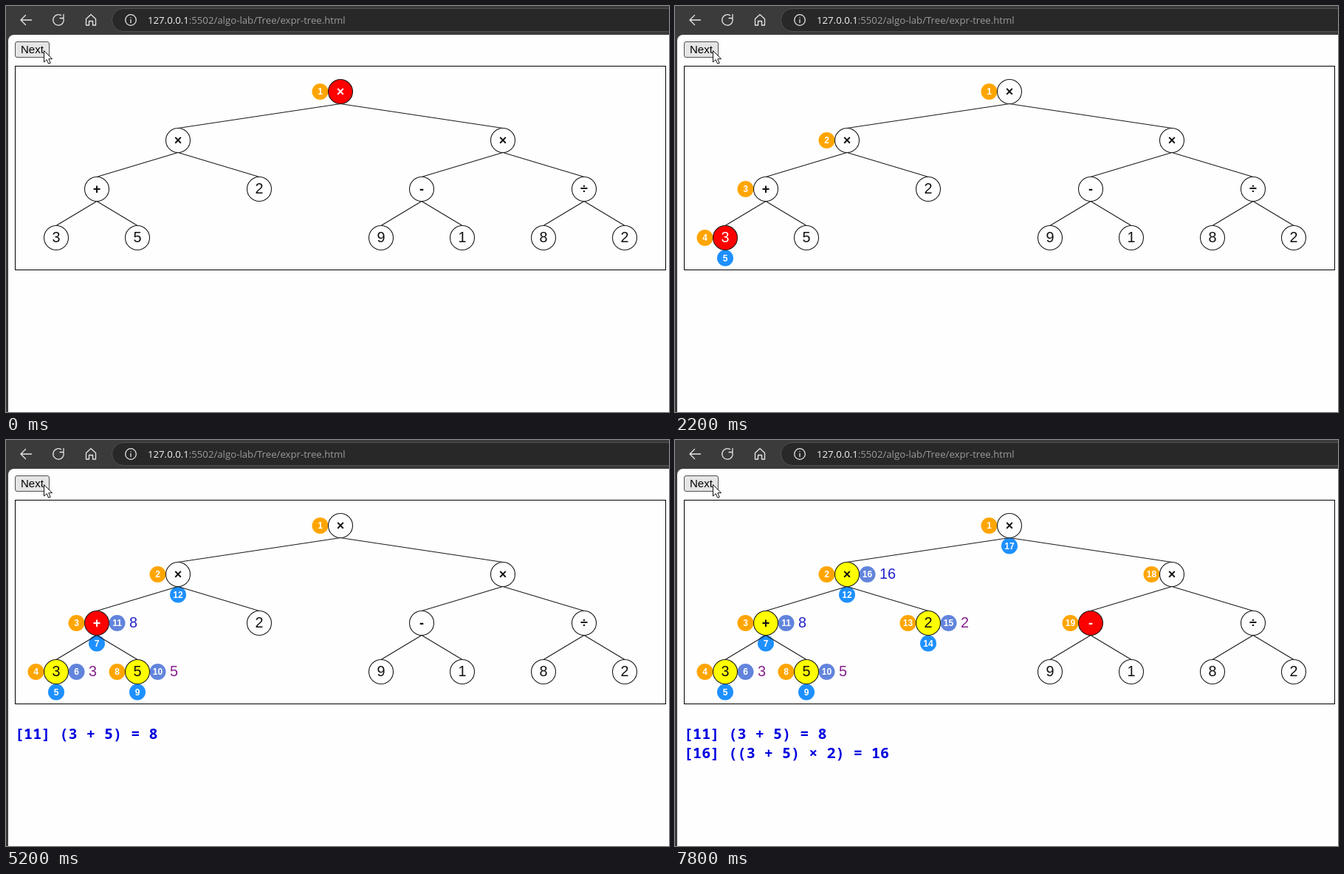
An HTML page with a canvas for the animation above (8000 ms loop, 898 by 550 pixels).

```html
<!DOCTYPE html>
<html lang="en">
<head>
<meta charset="utf-8">
<title>Expression tree</title>
<style>
html, body { margin: 0; width: 100%; height: 100%; overflow: hidden; background: #fefefe; }
canvas { display: block; }
</style>
</head>
<body>
<canvas id="stage" width="898" height="550"></canvas>
<script>
const ctx = document.getElementById('stage').getContext('2d');
const LOOP = 8000, PRESS = 200;
const clicks = [600, 1200, 1800, 2600, 3600, 4400, 5000, 5800, 6400, 6800, 7200, 7800];
const SANS = '"Liberation Sans", Arial, sans-serif';
const MONO = '"Noto Sans Mono", "DejaVu Sans Mono", monospace';
const URL_FONT = '13.2px "Open Sans", "Noto Sans", sans-serif';

const ops = {
  '+': (a, b) => a + b,
  '-': (a, b) => a - b,
  '×': (a, b) => a * b,
  '÷': (a, b) => a / b
};
const tree = ['×', ['×', ['+', 3, 5], 2], ['×', ['-', 9, 1], ['÷', 8, 2]]];
const spread = [220, 110, 55];
const nodes = [];

function build(spec, x, depth) {
  const leaf = !Array.isArray(spec);
  const node = { x, y: 116 + 66 * depth, leaf, label: String(leaf ? spec : spec[0]) };
  nodes.push(node);
  if (leaf) {
    node.value = spec;
    node.expr = node.label;
  } else {
    const d = spread[depth];
    node.left = build(spec[1], x - d, depth + 1);
    node.right = build(spec[2], x + d, depth + 1);
    node.value = ops[node.label](node.left.value, node.right.value);
    node.expr = `(${node.left.expr} ${node.label} ${node.right.expr})`;
  }
  return node;
}

// Walk the tree once, noting at which click each mark appears.
const marks = [], active = [], log = [];
let count = 0;

function mark(node, dx, dy, color) {
  marks.push({ x: node.x + dx, y: node.y + dy, color, num: ++count, click: active.length - 1 });
}

function visit(node) {
  active.push(node);
  mark(node, -27.5, 0, '#ffa500');
  if (!node.leaf) visit(node.left);
  mark(node, 0, 27.5, '#1e90ff');
  if (!node.leaf) visit(node.right);
  active.push(node);
  node.done = active.length - 1;
  mark(node, 27.5, 0, '#6284dc');
  if (!node.leaf) log.push({ click: node.done, text: `[${count}] ${node.expr} = ${node.value}` });
}
visit(build(tree, 453, 0));

function text(str, x, y, font, color, align = 'left') {
  ctx.font = font;
  ctx.fillStyle = color;
  ctx.textAlign = align;
  ctx.fillText(str, x, y);
}

function disc(x, y, r, fill) {
  ctx.beginPath();
  ctx.arc(x, y, r, 0, Math.PI * 2);
  ctx.fillStyle = fill;
  ctx.fill();
}

function box(x, y, w, h, r, fill, stroke) {
  ctx.beginPath();
  ctx.roundRect(x, y, w, h, r);
  ctx.fillStyle = fill;
  ctx.fill();
  if (!stroke) return;
  ctx.strokeStyle = stroke;
  ctx.lineWidth = 1;
  ctx.stroke();
}

function line(path, color, width) {
  ctx.strokeStyle = color;
  ctx.lineWidth = width;
  ctx.stroke(new Path2D(path));
}

function drawBrowser() {
  ctx.fillStyle = '#3b3b3b';
  ctx.fillRect(0, 0, 898, 550);
  box(143.5, 3.5, 790, 31, 15.5, '#282828', '#505050');
  box(3, 39, 920, 540, 8, '#fefefe');

  ctx.lineCap = ctx.lineJoin = 'round';
  const icon = '#e6e6e6';
  line('M20 19H34.5M26.5 12.5L20 19L26.5 25.5', icon, 1.3);
  line('M77.8 16.5A7.2 7.2 0 1 1 74.5 12.6M78 11.5V16.5H73', icon, 1.3);
  line('M108.5 17.5L115 11.5L121.5 17.5V26H117.5V20.5H112.5V26H108.5Z', icon, 1.3);
  line('M176.3 19A7.3 7.3 0 1 1 161.7 19A7.3 7.3 0 1 1 176.3 19M169 18.5V22.5M169 15.6V15.8', icon, 1.3);
  ctx.lineCap = 'butt';
  ctx.lineJoin = 'miter';

  const host = '127.0.0.1';
  text(host, 192, 24, URL_FONT, '#f4f4f4');
  text(':5502/algo-lab/Tree/expr-tree.html', 192 + ctx.measureText(host).width, 24, URL_FONT, '#9b9b9b');
}

function drawButton(pressed) {
  box(12.5, 48.5, 46, 21, 2.5, pressed ? '#f5f5f5' : '#e5e5e5', pressed ? '#8d8d8d' : '#505050');
  text('Next', 20, 64, '15px ' + SANS, '#000');
}

function drawTree(step) {
  ctx.strokeStyle = '#000';
  ctx.lineWidth = 1;
  ctx.strokeRect(12.5, 81.5, 881, 276);

  for (const m of marks) {
    if (m.click > step) continue;
    disc(m.x, m.y, 11, m.color);
    text(m.num, m.x, m.y + 4, 'bold 12px ' + SANS, '#fff', 'center');
  }

  for (const n of nodes) {
    if (n.leaf) continue;
    for (const c of [n.left, n.right]) {
      line(`M${n.x} ${n.y + 16.5}L${c.x} ${c.y - 16.5}`, '#1a1a1a', 1.1);
    }
  }

  for (const n of nodes) {
    const on = n === active[step], done = n.done <= step;
    disc(n.x, n.y, 16.5, on ? '#f00' : done ? '#ff0' : '#fefefe');
    ctx.strokeStyle = '#1a1a1a';
    ctx.lineWidth = 1.1;
    ctx.stroke();
    const font = (n.leaf ? '19.8px ' : 'bold 18px ') + SANS;
    text(n.label, n.x, n.y + 6, font, on ? '#fff' : '#111', 'center');
    if (done) text(n.value, n.x + 44, n.y + 6, '19.8px ' + SANS, n.leaf ? '#85208a' : '#2222cc');
  }
}

function drawLog(step) {
  log.filter(l => l.click <= step)
    .forEach((l, i) => text(l.text, 12, 405 + 26 * i, 'bold 20.16px ' + MONO, '#0000e0'));
}

function drawCursor() {
  const arrow = new Path2D('M51.5 60.5V76L55.2 72.6L57.7 78.3L60.2 77.2L57.8 71.7H62.5Z');
  ctx.fillStyle = '#fff';
  ctx.fill(arrow);
  ctx.strokeStyle = '#111';
  ctx.lineWidth = 1;
  ctx.stroke(arrow);
}

function draw(now) {
  const t = now % LOOP;
  const step = clicks.filter(c => c <= t).length;
  const pressed = clicks.some(c => t >= c - PRESS && t < c);
  drawBrowser();
  drawButton(pressed);
  drawTree(step);
  drawLog(step);
  drawCursor();
}

const start = performance.now();
function tick() {
  draw(performance.now() - start);
  requestAnimationFrame(tick);
}
tick();
</script>
</body>
</html>
```
